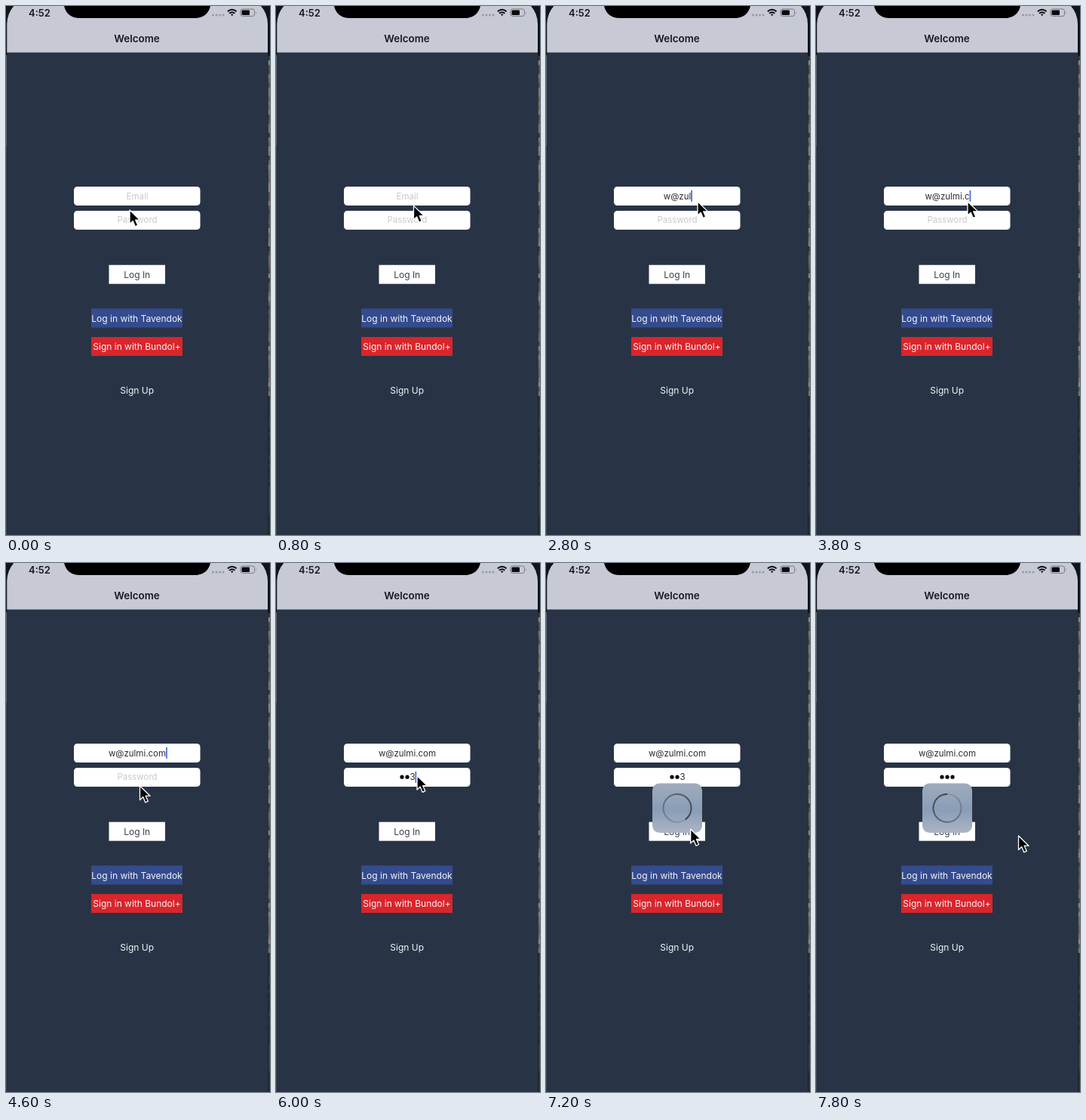
Animation, 350 px wide and 700 px high, one loop 8 s. Source, as an HTML page:

```html
<!DOCTYPE html>
<html lang="en">
<head>
<meta charset="utf-8">
<title>Login screen</title>
<style>
  html, body { margin: 0; width: 100%; height: 100%; overflow: hidden; background: #111519; }
  svg { display: block; width: 100%; height: 100%; font: 12px Inter, sans-serif; }
  text { text-anchor: middle; }
  .strong { font-weight: 600; font-size: 13.4px; fill: #17191d; }
  .light { fill: #f4f5f8; }
  .field { font-size: 11.5px; }
</style>
</head>
<body>
<svg viewBox="0 0 350 700">
  <defs>
    <clipPath id="screen"><rect x="1.3" y="-12" width="345.7" height="760" rx="36"/></clipPath>
    <linearGradient id="glass" x2="0" y2="1">
      <stop stop-color="#a0abbc"/>
      <stop offset=".55" stop-color="#899db7"/>
      <stop offset="1" stop-color="#acb6c5"/>
    </linearGradient>
    <linearGradient id="dimGlass" x2="0" y2="1">
      <stop stop-color="#2c3c52"/>
      <stop offset=".84" stop-color="#2e3f56"/>
      <stop offset="1" stop-color="#f0f1f3"/>
    </linearGradient>
  </defs>

  <rect y="65" width="1.3" height="120" fill="#5e6a70"/>
  <rect y="185" width="1.3" height="515" fill="#3e4b52"/>
  <g id="edge"></g>

  <g clip-path="url(#screen)">
    <rect width="350" height="700" fill="#283446"/>
    <rect width="350" height="61.5" fill="#c7cad5"/>
  </g>
  <path d="M77 0C79.5 10 86 16 98 16H250C262 16 268.5 10 271 0Z"/>

  <text class="strong" x="44.5" y="13.5" style="font-size:13px">4:52</text>
  <g fill="#969aa5">
    <circle cx="274.5" cy="12" r="1.5"/><circle cx="279" cy="12" r="1.5"/>
    <circle cx="283.5" cy="12" r="1.5"/><circle cx="288" cy="12" r="1.5"/>
  </g>
  <g fill="none" stroke="#090a0c" stroke-width="2">
    <path d="M293.8 7.2Q299.7 2.3 305.6 7.2M296 9.8Q299.7 6.7 303.4 9.8"/>
    <path d="M298 11L299.7 13.3L301.4 11Q299.7 9.8 298 11Z" fill="#090a0c" stroke="none"/>
  </g>
  <rect x="311" y="4" width="18.5" height="9.5" rx="2.6" fill="none" stroke="#777b85"/>
  <rect x="312.5" y="5.5" width="10.5" height="6.5" rx="1.2" fill="#090a0c"/>
  <path d="M331 7.2Q332.8 8.7 331 10.4Z" fill="#777b85"/>
  <text class="strong" x="173.5" y="48">Welcome</text>

  <rect x="90" y="239" width="167.5" height="25" rx="4.5" fill="#fff"/>
  <rect x="90" y="271" width="167.5" height="25" rx="4.5" fill="#fff"/>
  <text class="field" id="email" x="174" y="255.8"></text>
  <text class="field" id="password" x="174" y="287.4"></text>
  <g id="dots" fill="#0b0b0d"></g>
  <rect id="caret" width="1.7" height="15" fill="#3f6cdb"/>

  <rect x="136.5" y="342.7" width="74.5" height="25" fill="#fff"/>
  <text id="login" x="173.7" y="360">Log In</text>
  <rect x="113" y="400.3" width="121" height="25.2" fill="#344b8d"/>
  <text class="light" x="173.5" y="417.5">Log in with Tavendok</text>
  <rect x="113" y="438" width="121" height="25" fill="#d9252b"/>
  <text class="light" x="173.5" y="455.2">Sign in with Bundol+</text>
  <text class="light" x="173.7" y="513">Sign Up</text>

  <rect id="dimCard" x="149" y="300" width="49.5" height="46.5" rx="7" fill="url(#dimGlass)"/>
  <rect id="card" x="141" y="291.5" width="66" height="65.5" rx="9.5" fill="url(#glass)"/>
  <g id="ring" fill="none" stroke="#3a3e45" stroke-width="2"></g>
  <path id="pointer" d="M0 0V18.5L4.2 14.6L7.2 21.8L10.8 20.2L7.7 13.2H13.6Z"
        stroke="#fff" stroke-width="1.3" stroke-linejoin="round"/>
</svg>

<script>
const LOOP = 8000, STEP = 200, CENTER = 174;
const address = "w@zulmi.com", secret = "123";
const emailKeys = [1400, 2000, 2400, 2600, 2800, 3000, 3200, 3400, 3800, 4000, 4200];
const secretKeys = [5400, 5600, 5800];
const emailFocus = 1000, secretFocus = 5000, pressStart = 6600, cardStart = 6800;
const cardFull = 7000, maskAll = 7400;

// time, x, y of the pointer tip
const route = [
  [0, 164, 270], [400, 164, 270], [1200, 201, 258.7], [4200, 201, 258.7],
  [4600, 177.5, 295], [5000, 187, 281.5], [6200, 187, 281.5],
  [6600, 177.5, 350.7], [7000, 177.5, 350.7], [7800, 268.5, 361]
];

const $ = id => document.getElementById(id);
const show = (id, on) => $(id).style.display = on ? "" : "none";
const typed = (keys, t) => keys.filter(time => t >= time).length;

function addShape(parent, name, attributes) {
  const shape = document.createElementNS("http://www.w3.org/2000/svg", name);
  for (const key in attributes) shape.setAttribute(key, attributes[key]);
  $(parent).append(shape);
}

// mottled wallpaper beside the phone
let seed = 7;
const random = () => (seed = seed * 16807 % 2147483647) / 2147483647;
for (let y = 66; y < 700; y += 6) {
  const rock = y < 515;
  const light = rock ? 22 + random() * 30 : 17 + random() * 6;
  addShape("edge", "rect", {
    x: 347.6, y, width: 2.4, height: 6,
    fill: `hsl(${rock ? 60 : 165} ${rock ? 6 : 18}% ${light}%)`
  });
}

const ringPoint = (angle, r) => `${r * Math.sin(angle)} ${-r * Math.cos(angle)}`;
const slices = 60;
for (let i = 0; i < slices; i++) {
  const from = i / slices * 2 * Math.PI, to = (i + 1.1) / slices * 2 * Math.PI;
  addShape("ring", "path", {
    d: `M${ringPoint(from, 18.5)}A18.5 18.5 0 0 1 ${ringPoint(to, 18.5)}`,
    opacity: 0.12 + 0.88 * i / slices
  });
}
for (let i = 0; i < 3; i++) {
  addShape("dots", "circle", { cx: 0, cy: 283.2, r: 2.6 });
}

function setText(id, text, placeholder) {
  $(id).textContent = text || placeholder;
  $(id).style.fill = text ? "#2a2b2e" : "#c9c9cd";
}

function pointerAt(t) {
  const next = route.findIndex(point => point[0] > t);
  if (next < 0) return route[route.length - 1].slice(1);
  const [t0, x0, y0] = route[next - 1], [t1, x1, y1] = route[next];
  const p = (t - t0) / (t1 - t0), ease = p * p * (3 - 2 * p);
  return [x0 + (x1 - x0) * ease, y0 + (y1 - y0) * ease];
}

function drawPassword(t) {
  const count = typed(secretKeys, t);
  const hidden = t >= maskAll ? count : Math.max(0, count - 1);
  const left = CENTER - count * 3.5;
  setText("password", hidden < count ? secret[count - 1] : "", count ? "" : "Password");
  $("password").setAttribute("x", count ? left + hidden * 7 + 3.5 : CENTER);
  [...$("dots").children].forEach((dot, i) => {
    dot.setAttribute("cx", left + i * 7 + 3.5);
    dot.style.display = i < hidden ? "" : "none";
  });
  return count;
}

function drawCaret(t, secretCount) {
  const onEmail = t < secretFocus;
  show("caret", t >= emailFocus && t < pressStart);
  const field = $(onEmail ? "email" : "password");
  const half = field.getComputedTextLength() / 2;
  const empty = onEmail ? t < emailKeys[0] : !secretCount;
  const end = onEmail || empty ? CENTER + (empty ? -half : half) : CENTER + secretCount * 3.5;
  $("caret").setAttribute("x", end + (empty ? -1.5 : 0));
  $("caret").setAttribute("y", onEmail ? 243.8 : 275.8);
}

function draw(t) {
  setText("email", address.slice(0, typed(emailKeys, t)), "Email");
  drawCaret(t, drawPassword(t));
  $("login").style.fill = t >= pressStart && t < cardFull ? "#c3c5ca" : "#364152";

  const full = t >= cardFull;
  show("dimCard", t >= cardStart && !full);
  show("card", full);
  show("ring", t >= cardStart);
  const turn = (t - 7800) / 1000 * 360;
  $("ring").setAttribute("transform",
    `translate(174 324.3) rotate(${turn}) scale(${full ? 1 : 0.76})`);
  $("ring").setAttribute("opacity", full ? 1 : 0.35);
  $("pointer").setAttribute("transform", `translate(${pointerAt(t)})`);
}

function tick() {
  draw(Math.floor(performance.now() % LOOP / STEP) * STEP);
  requestAnimationFrame(tick);
}
tick();
</script>
</body>
</html>
```
